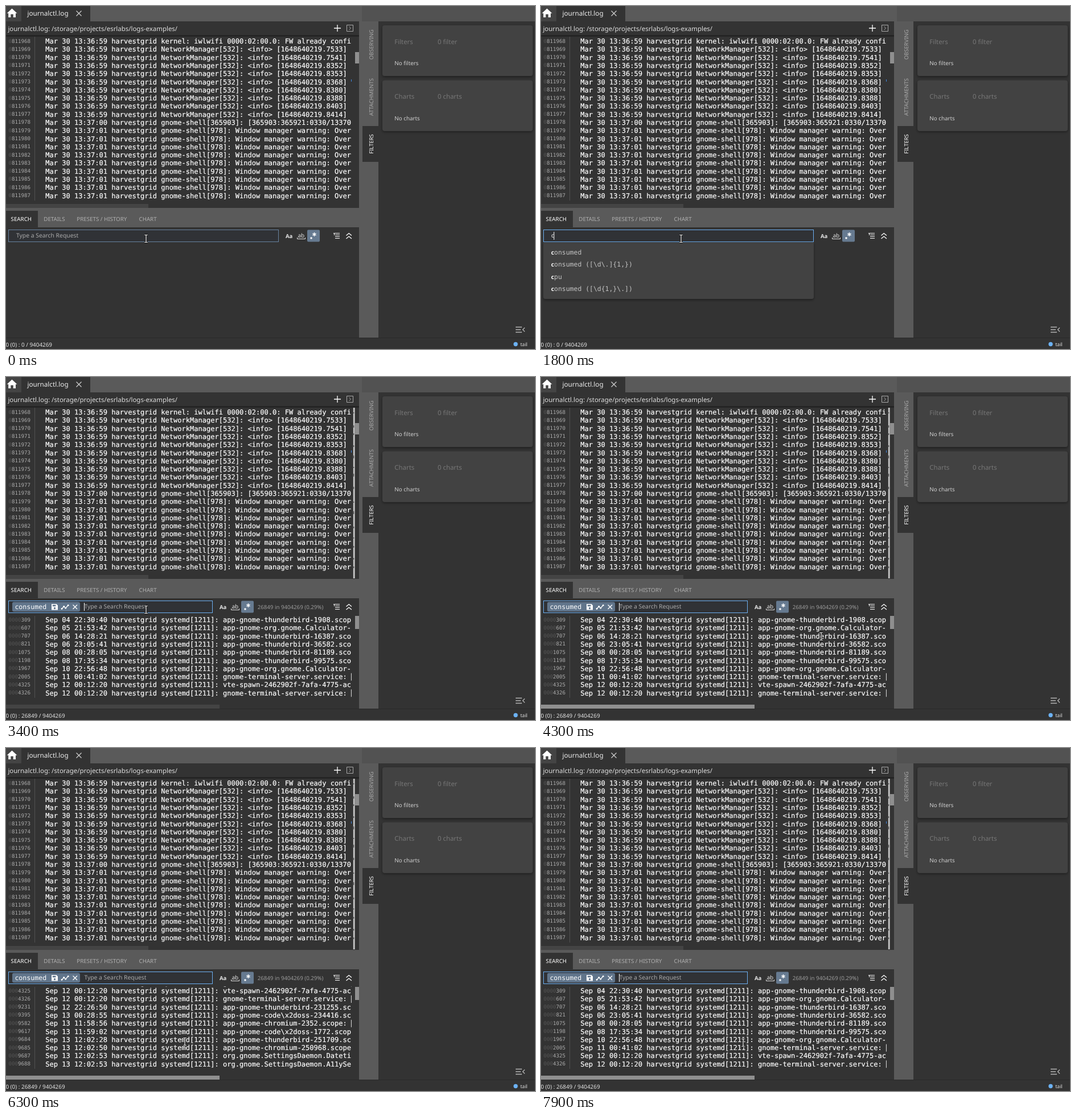
An HTML page that plays this animation: 929 by 603 pixels, repeating every 8 s.

```html
<!DOCTYPE html>
<html lang="en">
<head>
<meta charset="utf-8">
<title>Log search</title>
<style>
html, body { margin: 0; width: 100%; height: 100%; overflow: hidden; background: #333; }
svg { display: block; width: 929px; height: 603px; }
text { font-family: "Noto Sans", "Open Sans", sans-serif; white-space: pre; text-rendering: geometricPrecision; }
.mono { font-family: "DejaVu Sans Mono", monospace; }
.log { stroke: #fff; stroke-width: .2; }
.line { fill: none; stroke: #fff; stroke-width: 1.3; }
</style>
</head>
<body>
<svg id="stage" viewBox="0 0 929 603" xmlns="http://www.w3.org/2000/svg"></svg>
<script>
const LOOP = 8000, PITCH = 100 / 7, HOST = "harvestgrid";

const esc = s => s.replace(/&/g, "&amp;").replace(/</g, "&lt;");
const rect = (x, y, w, h, fill, more = "") =>
  `<rect x="${x}" y="${y}" width="${w}" height="${h}" fill="${fill}" ${more}/>`;
const text = (x, y, s, size, fill, more = "") =>
  `<text x="${x}" y="${y}" font-size="${size}" fill="${fill}" ${more}>${esc(s)}</text>`;
const mono = (x, y, s, size, fill, kind = "") => text(x, y, s, size, fill, `class="mono ${kind}"`);
const line = (d, more = "") => `<path class="line" d="${d}" ${more}/>`;
const group = (id, body, more = "") => `<g id="${id}" ${more}>${body}</g>`;

// One log line: padded number, then the message
function row(y, num, msg) {
  const digits = String(num), pad = "0".repeat(7 - digits.length);
  const hit = /service: $|scope: $/.test(msg) ? rect(605.9, y - 10.5, 1.1, 13, "#d0d0d0") : "";
  return `<text class="mono" x="4.6" y="${y - 1.6}" font-size="9.15" fill="#555">${pad}<tspan fill="#adadad">${digits}</tspan></text>` +
    mono(69.2, y, msg, 12.06, "#fff", "log") + hit;
}

const stamps = "7533 7541 8352 8353 8368 8380 8388 8403 8414".split(" ");
const mainLog = [
  `Mar 30 13:36:59 ${HOST} kernel: iwlwifi 0000:02:00.0: FW already confi`,
  ...stamps.map(s => `Mar 30 13:36:59 ${HOST} NetworkManager[532]: <info> [1648640219.${s}]`),
  `Mar 30 13:37:00 ${HOST} gnome-shell[365903]: [365903:365921:0330/13370`,
  ...Array(9).fill(`Mar 30 13:37:01 ${HOST} gnome-shell[978]: Window manager warning: Over`)
];

const found = [
  [309, "04 22:30:40", "app-gnome-thunderbird-1908.scop"],
  [607, "05 21:53:42", "app-gnome-org.gnome.Calculator-"],
  [707, "06 14:28:21", "app-gnome-thunderbird-16387.sco"],
  [821, "06 23:05:41", "app-gnome-thunderbird-36582.sco"],
  [1075, "08 00:28:05", "app-gnome-thunderbird-81189.sco"],
  [1198, "08 17:35:34", "app-gnome-thunderbird-99575.sco"],
  [1967, "10 22:56:48", "app-gnome-org.gnome.Calculator-"],
  [2005, "11 00:41:02", "gnome-terminal-server.service: "],
  [4325, "12 00:12:20", "vte-spawn-2462902f-7afa-4775-ac"],
  [4326, "12 00:12:20", "gnome-terminal-server.service: "],
  [9231, "12 22:26:50", "app-gnome-thunderbird-231255.sc"],
  [9395, "13 00:28:55", "app-gnome-code\\x2doss-234416.sc"],
  [9582, "13 11:58:56", "app-gnome-chromium-2352.scope: "],
  [9617, "13 11:59:02", "app-gnome-code\\x2doss-1772.scop"],
  [9684, "13 12:02:28", "app-gnome-thunderbird-251709.sc"],
  [9685, "13 12:02:50", "app-gnome-chromium-250968.scope"],
  [9687, "13 12:02:53", "org.gnome.SettingsDaemon.Dateti"],
  [9688, "13 12:02:53", "org.gnome.SettingsDaemon.A11ySe"],
  ..."Color Sound Power Housek Keyboa Smartc Rfkill Wacom".split(" ").map((s, i) =>
    [9689 + i, "13 12:02:53", `org.gnome.SettingsDaemon.${s}`])
];

const card = (y, title, count, note) =>
  rect(661, y, 264, 89, "#434343", 'rx="4" filter="url(#shade)"') +
  text(682.3, y + 32.5, title, 11.4, "#777") + text(758, y + 32.5, count, 11.4, "#777") +
  text(682.3, y + 70.3, note, 9.8, "#d0d0d0");

const sideTab = (y, s, fill) =>
  text(0, 0, s, 9.5, fill, `transform="translate(644.6 ${y}) rotate(-90)"`);

function frame() {
  return rect(0, 0, 929, 603, "#333") +
    rect(0, 0, 929, 27, "#5a5a5a") + rect(625, 0, 304, 27, "#525252") +
    rect(0, 0, 27, 27, "#444") + rect(27, 0, 121, 27, "#333") +
    '<path d="M10.5 4.5 L19.5 12.8 H17 V20 H12.8 V14.5 H8.3 V20 H4.2 V12.8 H1.6Z" fill="#fff"/>' +
    text(37.4, 16.6, "journalctl.log", 11.7, "#eee") +
    line("M123.5 8.5 l9 9 m0 -9 l-9 9", 'style="stroke:#ccc"') +
    text(3.4, 43.6, "journalctl.log: /storage/projects/esrlabs/logs-examples/", 11.45, "#ddd") +
    line("M576 39 h12 m-6 -6 v12") +
    line("M598.5 33.5 h11 v11 h-11z m4 2.5 l3 3 l-3 3", 'style="stroke:#aaa;stroke-width:1"') +
    rect(0, 51.5, 620, 2, "#1f1f1f") + rect(50, 54, 1, 288, "#505050");
}

function mainPane() {
  const rows = mainLog.map((m, i) => row(66.1 + i * PITCH, 811968 + i, m)).join("");
  return `<g clip-path="url(#top)">${rows}</g>` +
    rect(606, 129, 1, 4, "#3f86e0") +
    rect(613, 81, 7, 20, "#8f8f8f") + rect(0, 348, 250, 7, "#444");
}

function minimap() {
  let out = rect(609.8, 54, 2.8, 300, "#c6c6c6"), seed = 7;
  for (let y = 62; y < 350; y += 12 + seed % 19) {
    seed = (seed * 37 + 11) % 101;
    out += rect(609.8, y, 1.4, 2 + seed % 4, "#555");
  }
  return out;
}

function bottomTabs() {
  const tabs = [[66.3, "DETAILS"], [124.3, "PRESETS / HISTORY"], [233.5, "CHART"]];
  return rect(0, 355, 620, 34, "#5a5a5a") + rect(0, 360, 56, 29, "#333") +
    text(8.6, 377.6, "SEARCH", 9.75, "#fff") +
    tabs.map(([x, s]) => text(x, 377.6, s, 9.75, "#b0b0b0")).join("");
}

function sidebar() {
  return rect(620, 27, 34, 556, "#5a5a5a") + rect(626, 211, 28, 63, "#333") +
    sideTab(94.3, "OBSERVING", "#aaa") + sideTab(193, "ATTACHMENTS", "#aaa") + sideTab(259.8, "FILTERS", "#fff") +
    card(34, "Filters", "0 filter", "No filters") +
    card(130.7, "Charts", "0 charts", "No charts") +
    line("M895 564.5 h11 m-11 4.5 h9 m-9 4.5 h11 m5 -8 l-3.5 3.5 l3.5 3.5", 'style="stroke:#b5b5b5"');
}

function statusBar() {
  return rect(0, 583, 929, 1, "#2a2a2a") +
    '<text id="status" x="-0.6" y="598.8" font-size="9.9" fill="#e0e0e0"></text>' +
    '<circle cx="895" cy="594.5" r="3.7" fill="#6cb2f5"/>' + text(903.2, 598, "tail", 8.7, "#ddd");
}

function searchBar() {
  const dot = rect(534.5, 406.5, 3, 3, "#fff");
  const star = line("M541.5 398 v7 m-3 -5.2 l6 3.4 m0 -3.4 l-6 3.4", 'style="stroke-width:1.4"');
  const tools = text(491, 407.6, "Aa", 9.5, "#e6e6e6", 'font-weight="600"') +
    text(512.5, 407, "ab", 10, "#e6e6e6", 'font-weight="500"') +
    line("M511.5 407 v2.5 h14 v-2.5", 'style="stroke:#ddd;stroke-width:1"') +
    rect(529, 393.5, 22, 21, "#667a90", 'rx="2"') + dot + star;
  const chip = rect(11, 395.5, 119, 17, "#61758b", 'rx="3"') +
    mono(15.4, 408, "consumed", 11.6, "#fff") +
    '<path fill-rule="evenodd" fill="#fff" d="M80 399 h8.5 l2.5 2.5 v8 h-11z M81.8 400.5 v2.8 h5.6 v-2.8z M85.5 404.8 a1.7 1.7 0 1 0 .01 0z"/>' +
    line("M98 407.5 l3.7 -4 l3 2.8 l4.5 -5") + line("M117.5 400.5 l7.5 7.5 m0 -7.5 l-7.5 7.5") +
    [[98, 407.5], [101.7, 403.5], [104.7, 406.3], [109.2, 401.3]].map(([x, y]) =>
      `<circle cx="${x}" cy="${y}" r="1.4" fill="#fff"/>`).join("");
  return '<rect id="box" x="4.5" y="393.5" height="21" fill="#303236" stroke-width="1"/>' +
    group("chip", chip) +
    text(18, 407.4, "Type a Search Request", 10.35, "#aaa", 'id="hint"') +
    text(18, 407.4, "", 10.35, "#f0f0f0", 'id="typed"') +
    rect(0, 397, 1, 14, "#fff", 'id="caret"') +
    group("tools", tools) +
    text(441.7, 407.8, "26849 in 9404269 (0.29%)", 9.7, "#9a9a9a", 'id="count"') +
    line("M575 399.5 h11 m-8 3 h8 m-8 3 h8 m-8 3 h8 M576.5 400 v3", 'style="stroke-width:1"') +
    line("M597.5 403.5 l4.7 -4 l4.7 4 m-9.4 5.5 l4.7 -4 l4.7 4");
}

const option = (i, head, tail) =>
  `<text x="17.8" y="${437 + i * 21.45}" font-size="10.25" font-weight="700" fill="#fff">${head}` +
  `<tspan class="mono" font-size="11.45" font-weight="400" fill="#c4c4c4">${tail}</tspan></text>`;

function menu(id, h, items, extra = "") {
  const body = `<path d="M4 415.5 h475 v${h - 4} q0 4 -4 4 h-467 q-4 0 -4 -4z" fill="#424242" filter="url(#shade)"/>`;
  return group(id, body + extra + items.map(([a, b], i) => option(i, a, b)).join(""));
}

const A = " ([\\d\\.]{1,})", B = " ([\\d{1,}\\.])";
const menus = () =>
  menu("menu1", 99.5, [["c", "onsumed"], ["c", "onsumed" + A], ["c", "pu"], ["c", "onsumed" + B]]) +
  menu("menu2", 77.5, [["consumed", ""], ["consumed", A], ["consumed", B]],
    rect(4, 422, 475, 22, "#505050") + line("M450 433.5 l4 4 l9.5 -9.5", 'style="stroke:#aaa;stroke-width:1.7"'));

const results = () =>
  rect(50, 420, 1, 144, "#505050") + '<g clip-path="url(#low)"><g id="rows">' +
  found.map(([n, d, m], i) => row(431.2 + i * PITCH, n, `Sep ${d} ${HOST} systemd[1211]: ${m}`)).join("") +
  "</g></g>" + rect(613, 420, 7, 23, "#8f8f8f") + rect(0, 576, 375, 7, "#444", 'id="bar"');

const beam = "M-2.7 -6.5 h2 q.7 0 .7 .8 v11.4 q0 .8 -.7 .8 h-2 M2.7 -6.5 h-2 q-.7 0 -.7 .8 m0 11.4 q0 .8 .7 .8 h2";

document.getElementById("stage").innerHTML =
  `<defs><clipPath id="top"><rect x="0" y="54" width="607" height="292"/></clipPath>
  <clipPath id="low"><rect x="0" y="419" width="607" height="144"/></clipPath>
  <filter id="shade" x="-5%" y="-10%" width="110%" height="125%"><feDropShadow dx="0" dy="2" stdDeviation="2" flood-opacity=".4"/></filter></defs>` +
  frame() + mainPane() + group("map", minimap()) + bottomTabs() + group("results", results()) +
  searchBar() + menus() + sidebar() + statusBar() +
  group("mouse", line(beam, 'style="stroke:#111;stroke-width:2.8"') + line(beam, 'style="stroke-width:1.2"'));

const el = id => document.getElementById(id);
const show = (id, on) => { el(id).style.display = on ? "" : "none"; };
const set = (id, name, v) => el(id).setAttribute(name, v);
const at = (table, t) => table.filter(s => s[0] <= t).pop();

const caretOn = [[400, 1100], [1600, 2200], [2800, 3700], [4300, 4900], [5500, 6100], [6700, 7300], [7900, 8000]];
const caretX = [[0, 18], [1600, 22.3], [3000, 68], [3200, 137]];
const typed = [[0, ""], [1600, "c"], [3000, "consumed"], [3200, ""]];
const scroll = [[0, 0], [6300, 8], [6400, 16], [6700, 8], [6800, 0]];
const unfold = [[0, .85, .6], [1700, .97, 1], [1800, 1, 1]];
const mouse = [
  [0, 246, 409], [3900, 282, 392], [4000, 360, 386], [4100, 425, 402], [4200, 468, 432], [4300, 492, 456], [4400, 499, 467],
  [4700, 501, 472], [4800, 504, 479], [5000, 505, 484], [5200, 440, 470], [5300, 335, 448], [5400, 266, 438],
  [5500, 260, 442], [5600, 266, 455], [5700, 279, 470], [5900, 294, 489], [6000, 308, 508], [6100, 314, 516],
  [7100, 322, 524], [7200, 340, 534], [7300, 355, 538], [7400, 364, 538], [7500, 366, 533],
  [7600, 363, 528], [7700, 360, 523], [7800, 357, 520], [7900, 355, 518]
];

function draw(t) {
  const chip = t >= 3200, word = at(typed, t)[1];
  set("box", "width", chip ? 358 : 474);
  set("box", "stroke", t < 400 ? "#67829f" : "#6cb0f2");
  show("chip", chip);
  show("count", chip);
  show("hint", !word);
  set("hint", "x", chip ? 137.4 : 18);
  el("typed").textContent = word;
  set("caret", "x", at(caretX, t)[1]);
  show("caret", caretOn.some(([a, b]) => t >= a && t < b));
  set("tools", "transform", `translate(${chip ? -116 : 0} 0)`);
  el("status").textContent = `0 (0) : ${chip ? 26849 : 0} / 9404269`;

  const [, scale, alpha] = at(unfold, t);
  show("menu1", t >= 1600 && t < 3000);
  set("menu1", "transform", `translate(0 415.5) scale(1 ${scale}) translate(0 -415.5)`);
  set("menu1", "opacity", alpha);
  show("menu2", t >= 3000 && t < 3100);

  show("results", t >= 3300);
  show("map", t >= 3400);
  set("rows", "transform", `translate(0 ${-at(scroll, t)[1] * PITCH})`);
  set("bar", "fill", t < 4100 ? "#444" : "#8f8f8f");
  const [, x, y] = at(mouse, t);
  set("mouse", "transform", `translate(${x} ${y})`);
}

const start = performance.now();
function tick() {
  draw((performance.now() - start) % LOOP);
  requestAnimationFrame(tick);
}
tick();
</script>
</body>
</html>
```
